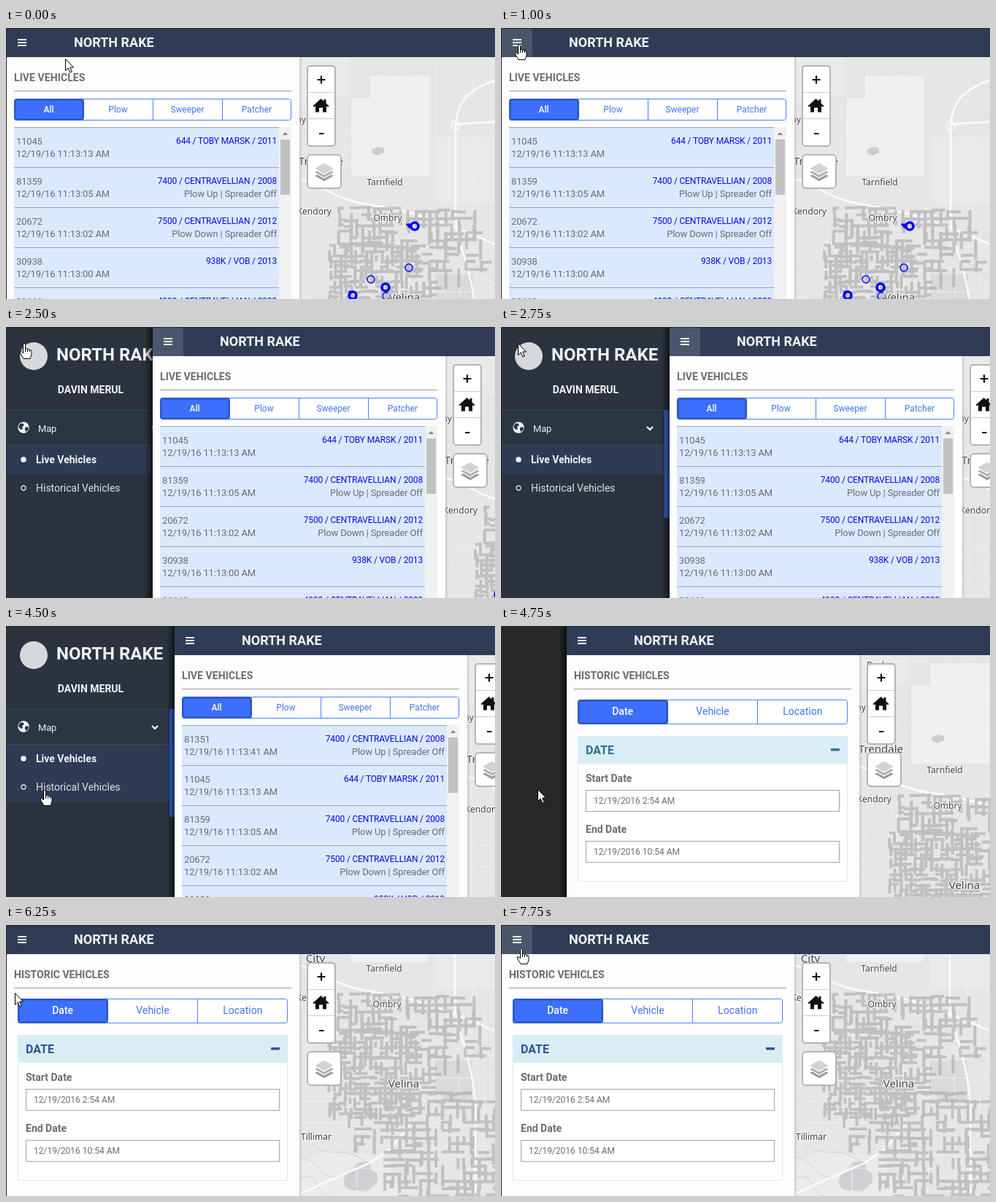
Write an HTML page that moves like this. It is 670 px wide and 372 px high and loops after 8000 ms.

```html
<!DOCTYPE html>
<html lang="en">
<head>
<meta charset="utf-8">
<title>Live vehicles</title>
<style>
html, body { margin: 0; width: 100%; height: 100%; overflow: hidden; background: #282828; }
svg { display: block; }
text { font-family: Roboto, Arial, sans-serif; font-size: 14px; fill: #6a6c74; }
.b { font-weight: 700; }
.s13 { font-size: 13px; letter-spacing: -.15px; }
.s12 { font-size: 12px; }
.mid { text-anchor: middle; }
.end { text-anchor: end; }
.light { fill: #f1f3f5; }
.on { fill: #fff; font-weight: 500; }
.link { fill: #3f74f2; }
.model { font-size: 12px; letter-spacing: -.17px; fill: #0a0ae6; text-anchor: end; }
.place text { font-family: "Noto Sans", "Open Sans", sans-serif; font-size: 12px; fill: #474747;
  stroke: #f2f2f2; stroke-width: 2.5px; stroke-linejoin: round; paint-order: stroke; }
.place .big { font-size: 15px; }
.accent { fill: #31708f; }

/* 8 s loop, one step = 3.125% */
#page, #map, #list, #cursor, #arrow, #hand, #tile, #side, #hist, #live, #marks, #past, .accent {
  animation: 8s step-end infinite; }
#page { animation-name: slide; }
#map { animation-name: pan; }
#list { animation-name: list; }
#cursor { animation-name: move; }
#arrow { animation-name: arrow; }
#hand { animation-name: hand; }
#tile { animation-name: tile; }
#side { animation-name: side; }
#hist { animation-name: hist; }
#live, #marks { animation-name: live; }
#past { animation-name: past; }
.accent { animation-name: accent; }

@keyframes slide {
  0% { transform: translateX(0); }
  28.125% { transform: translateX(1px); }
  31.25% { transform: translateX(200px); }
  34.375% { transform: translateX(230px); }
  59.375% { transform: translateX(89px); }
  62.5% { transform: translateX(0); }
}
@keyframes pan {
  0% { transform: translateY(0); }
  59.375% { transform: translateY(-14px); }
  62.5% { transform: translateY(-120px); }
  65.625% { transform: translate(-1px, -152px); }
}
@keyframes list {
  0% { transform: translateY(-55px); }
  53.125% { transform: translateY(0); }
}
@keyframes move {
  0% { transform: translate(81px, 42px); }
  3.125% { transform: translate(66px, 37px); }
  6.25% { transform: translate(48px, 30px); }
  9.375% { transform: translate(32px, 25px); }
  12.5% { transform: translate(25px, 22px); }
  34.375% { transform: translate(23px, 22px); }
  37.5% { transform: translate(30px, 60px); }
  40.625% { transform: translate(40px, 107px); }
  43.75% { transform: translate(48px, 168px); }
  46.875% { transform: translate(53px, 225px); }
  59.375% { transform: translate(50px, 224px); }
  68.75% { transform: translate(44px, 205px); }
  71.875% { transform: translate(28px, 160px); }
  75% { transform: translate(9px, 120px); }
  78.125% { transform: translate(12px, 93px); }
  81.25% { transform: translate(18px, 63px); }
  84.375% { transform: translate(40px, 48px); }
  87.5% { transform: translate(59px, 36px); }
  90.625% { transform: translate(48px, 31px); }
  93.75% { transform: translate(35px, 31px); }
  96.875% { transform: translate(28px, 32px); }
}
@keyframes arrow {
  0%, 34.375%, 59.375% { visibility: visible; }
  9.375%, 43.75%, 93.75% { visibility: hidden; }
}
@keyframes hand {
  0%, 34.375%, 59.375% { visibility: hidden; }
  9.375%, 43.75%, 93.75% { visibility: visible; }
}
@keyframes tile {
  0%, 37.5% { visibility: hidden; }
  9.375%, 93.75% { visibility: visible; }
}
@keyframes side {
  0%, 59.375% { visibility: hidden; }
  28.125% { visibility: visible; }
}
@keyframes hist {
  0%, 59.375% { visibility: hidden; }
  46.875% { visibility: visible; }
}
@keyframes live {
  0% { visibility: visible; }
  59.375% { visibility: hidden; }
}
@keyframes past {
  0% { visibility: hidden; }
  59.375% { visibility: visible; }
}
@keyframes accent {
  0% { fill: #31708f; }
  62.5% { fill: #30548f; }
}
</style>
</head>
<body>
<svg width="670" height="372" viewBox="0 0 670 372">
  <defs>
    <clipPath id="listClip"><rect x="11" y="136" width="363" height="236"/></clipPath>
    <clipPath id="mapClip"><rect x="402" y="40" width="270" height="332"/></clipPath>
    <linearGradient id="edge"><stop offset="0" stop-opacity="0"/><stop offset="1" stop-opacity=".6"/></linearGradient>
    <linearGradient id="rim"><stop offset="0" stop-color="#aaa"/><stop offset="1" stop-color="#aaa" stop-opacity="0"/></linearGradient>
  </defs>

  <g id="side">
    <rect x="1" y="1" width="230" height="371" fill="#2b343e"/>
    <circle cx="38" cy="40" r="19" fill="#d6d9dc"/>
    <text x="69" y="46" class="b light" style="font-size:24px">NORTH RAKE</text>
    <text x="116" y="91" class="b light mid">DAVIN MERUL</text>
    <rect x="1" y="114" width="223" height="48" fill="#2b3643"/>
    <path d="M1 114.5H224M1 162.5H224" stroke="#3b4a60"/>
    <rect x="1" y="163" width="223" height="39" fill="#2f3b53"/>
    <rect id="hist" x="1" y="202" width="223" height="40" fill="#2f3b53"/>
    <rect x="224" y="114" width="7" height="148" fill="#3b6de0"/>
    <circle cx="24" cy="138" r="7.7" fill="#f4f6f8"/>
    <path d="M19 133l4-1 2 3-3 2 1 3-3 1-3-4zM26 138l4-1 1 3-3 4-2-2z" fill="#2b3643"/>
    <text x="44" y="144" class="s13 light">Map</text>
    <path d="M200 137l4 4 4-4" fill="none" stroke="#fff" stroke-width="2.2"/>
    <circle cx="24" cy="182" r="3.8" fill="#eef0f2"/>
    <text x="41" y="187" class="b light">Live Vehicles</text>
    <circle cx="24" cy="221" r="3" fill="none" stroke="#dfe3e6" stroke-width="1.3"/>
    <text x="41" y="226" style="fill:#dde1e5">Historical Vehicles</text>
  </g>

  <g id="page">
    <rect x="-10" y="1" width="11" height="371" fill="url(#edge)"/>
    <rect x="1" y="1" width="670" height="371" fill="#fdfdfd"/>

    <g clip-path="url(#mapClip)">
      <rect x="402" y="40" width="270" height="332" fill="#e6e6e7"/>
      <g id="map">
        <path d="M498 64H581V204H472V95H498Z" fill="#efefef" stroke="#d6d6d6" stroke-dasharray="3 2"/>
        <path d="M501 167l9-4 8 2v6l-9 4-7-3z" fill="#cdcdce"/>
        <path d="M402 41H470V92H430L402 110ZM590 150H670V240H590Z" fill="#e9eaea"/>
        <path d="M588 338H640V396H612L588 380Z" fill="#d9dada"/>
        <path d="M402 480L440 462 520 470 545 524H402Z" fill="#ebebeb"/>
        <path d="M464 505q0-12 12-18l6-9 14-2q7 4 4 11l9 6q5 12-5 17l-8 8-20-1q-12-3-12-12z" fill="#cfd0d3"/>
        <path d="M402 470q20 4 30 18t28 8M404 500q16-8 22 6t18 18M420 452q12 14 34 12t44 16M600 296q14 18 30 22t40 30"
          fill="none" stroke="#d0d0d0"/>
        <g id="lanes" fill="none" stroke="#ededee"></g>
        <g fill="none" stroke="#fbfbfb" stroke-width="2.5">
          <path d="M402 207C432 214 450 236 500 243S590 262 670 297"/>
          <path d="M670 72C640 82 618 96 616 135V262C618 300 640 330 644 400V524"/>
          <path d="M616 133C640 128 655 132 672 128M402 522L450 500 499 479 528 459 556 424"/>
          <circle cx="616" cy="134" r="6" stroke-width="1.5"/>
        </g>
        <path id="streets" fill="none" stroke="#a9a9a9" stroke-opacity=".62" stroke-width="4"/>
        <g id="marks"></g>
        <g class="place">
          <text x="412" y="72">Bexla</text>
          <text x="411" y="130" class="end">Tolny</text>
          <text x="462" y="188" class="big end">Trendale</text>
          <text x="425" y="203" class="big mid">City</text>
          <text x="519" y="216" class="mid">Tarnfield</text>
          <text x="446" y="256" class="end">Kendory</text>
          <text x="523" y="265" class="mid">Ombry</text>
          <text x="546" y="375" class="big mid">Velina</text>
          <text x="405" y="447">Tillimar</text>
        </g>
      </g>
      <rect x="402" y="40" width="4" height="332" fill="url(#rim)" opacity=".5"/>
    </g>

    <g stroke="#b4b4b4" stroke-width="2" fill="#fff">
      <rect x="413" y="52" width="38" height="110" rx="4"/>
      <rect x="413" y="174" width="46" height="46" rx="5"/>
      <path d="M414 88.5H450M414 124.5H450" stroke="#ccc" stroke-width="1"/>
    </g>
    <path d="M426.5 71H437.5M432 65.5V76.5M429 145H435.5" stroke="#111" stroke-width="2.2"/>
    <path d="M420.5 107L431.5 97 435.5 100.5V98H438.5V103.5L442.5 107 441 108.5 439 107V115.5H434V109.5H429V115.5H424V107L422 108.5Z" fill="#111"/>
    <g stroke="#fff" stroke-width="1.4">
      <path d="M422 203l14-8 14 8-14 8z" fill="#999"/>
      <path d="M422 198l14-8 14 8-14 8z" fill="#b0b0b0"/>
      <path d="M422 193l14-8 14 8-14 8z" fill="#d2d2d2"/>
    </g>

    <rect x="1" y="1" width="670" height="39" fill="#303c55"/>
    <rect id="tile" x="1" y="1" width="42" height="39" fill="#4a566b"/>
    <path d="M16 16H28M16 20H28M16 24H28" stroke="#fff" stroke-width="2"/>
    <text x="93" y="26" class="b light" style="font-size:18px">NORTH RAKE</text>
    <path d="M11 86.5H391" stroke="#9a9a9a"/>

    <g id="live">
      <text x="11" y="73" class="b" letter-spacing=".08">LIVE VEHICLES</text>
      <g id="liveTabs"></g>
      <g clip-path="url(#listClip)"><g id="list"></g></g>
      <rect x="374" y="136" width="17" height="236" fill="#f1f1f1"/>
      <rect x="376" y="153" width="13" height="76" fill="#c1c1c1"/>
      <path d="M378.5 147l4-4 4 4z" fill="#8a8a8a"/>
    </g>

    <g id="past">
      <text x="11" y="73" class="b">HISTORIC VEHICLES</text>
      <g id="pastTabs"></g>
      <rect x="16.5" y="151.5" width="369" height="199" fill="#fff" stroke="#d6ecf3"/>
      <rect x="16" y="151" width="370" height="38" fill="#d9edf6"/>
      <text x="27" y="176" class="b accent" style="font-size:16px">DATE</text>
      <rect x="363" y="168" width="12" height="3.5" rx="1" class="accent"/>
      <g fill="#fff" stroke="#a3a3a3">
        <rect x="27.5" y="225.5" width="347" height="29"/>
        <rect x="27.5" y="295.5" width="347" height="29"/>
      </g>
      <text x="27" y="214" class="b">Start Date</text>
      <text x="38" y="244" class="s12">12/19/2016 2:54 AM</text>
      <text x="27" y="284" class="b">End Date</text>
      <text x="38" y="314" class="s12">12/19/2016 10:54 AM</text>
    </g>
  </g>

  <path d="M0 .5H670M.5 0V372" stroke="#262626"/>

  <g id="cursor" stroke="#000" stroke-linejoin="round" fill="#fff">
    <path id="arrow" d="M.5 .5V16.5L4.2 13 6.8 19 9.3 18 6.7 12H11.5Z"/>
    <path id="hand" d="M-1.5 1.5Q0-.5 1.5 1.5V8Q3.5 6.500 4.5 8.5 6.5 7.5 7.5 9.500 10 9 10 11.5V16L8 21.5H-1L-5.5 14Q-6.5 11-4 11.5L-1.5 14ZM1.5 8V12M4.5 8.500V12M7.5 9.500V12"/>
  </g>
</svg>
<script>
const byId = id => document.getElementById(id);

function tabs(id, x, y, w, h, size, names) {
  const step = w / names.length;
  const edge = i => Math.floor(x + step * i) + .5;
  const first = edge(1) - x;
  let out = `<rect x="${x + .5}" y="${y + .5}" width="${w - 1}" height="${h - 1}" rx="3" fill="#fff" stroke="#4a80f5"/>
    <rect x="${x + .5}" y="${y + .5}" width="${first - .5}" height="${h - 1}" rx="3" fill="#3c6ffb" stroke="#2a50b8"/>
    <rect x="${x + 2}" y="${y + 2}" width="${first - 3.5}" height="${h - 4}" rx="2" fill="none" stroke="#2f5cd8" stroke-width="2"/>`;
  names.forEach((name, i) => {
    if (i > 1) out += `<path d="M${edge(i)} ${y}v${h}" stroke="#4a80f5"/>`;
    out += `<text x="${x + step * (i + .5)}" y="${Math.floor(y + h / 2 + size * .34)}" class="mid ${i ? 'link' : 'on'}" style="font-size:${size}px">${name}</text>`;
  });
  byId(id).innerHTML = out;
}
tabs('liveTabs', 11, 97, 380, 30, 12, ['All', 'Plow', 'Sweeper', 'Patcher']);
tabs('pastTabs', 16, 101, 370, 34, 14, ['Date', 'Vehicle', 'Location']);

const rows = [
  ['81351', '13:41', '7400 / CENTRAVELLIAN / 2008', 'Plow Up | Spreader Off'],
  ['11045', '13:13', '644 / TOBY MARSK / 2011', ''],
  ['81359', '13:05', '7400 / CENTRAVELLIAN / 2008', 'Plow Up | Spreader Off'],
  ['20672', '13:02', '7500 / CENTRAVELLIAN / 2012', 'Plow Down | Spreader Off'],
  ['30938', '13:00', '938K / VOB / 2013', ''],
  ['20668', '12:58', '4900 / CENTRAVELLIAN / 2009', '']
];
byId('list').innerHTML = rows.map(([id, time, model, state], i) => {
  const y = 136 + 55 * i;
  return `<rect x="11" y="${y}" width="363" height="55" fill="#dbe9fe"/>
    <path d="M11 ${y + .5}H374" stroke="#a0a4aa"/>
    <text x="14" y="${y + 24}" class="s13">${id}</text>
    <text x="14" y="${y + 41}" class="s13">12/19/16 11:${time} AM</text>
    <text x="371" y="${y + 23}" class="model">${model}</text>
    <text x="371" y="${y + 41}" class="s13 end">${state}</text>`;
}).join('');

let seed = 11;
const rand = () => (seed = seed * 16807 % 2147483647) / 2147483647;

// Serviced streets: short, slightly uneven runs inside each district (x, y, w, h, spacing, density)
const districts = [
  [455, 246, 78, 54, 8, .4],
  [443, 298, 112, 116, 7, .42],
  [540, 250, 112, 82, 10, .36],
  [553, 330, 34, 56, 9, .36],
  [478, 414, 50, 40, 9, .34],
  [518, 382, 150, 140, 10, .36]
];
let d = '';
for (const [x0, y0, w, h, step, p] of districts)
  for (let y = y0; y <= y0 + h; y += step)
    for (let x = x0; x <= x0 + w; x += step) {
      const run = step * (1 + 2 * rand()), shift = 3 * rand();
      if (rand() < p) d += `M${x} ${y + shift}h${run}`;
      if (rand() < p) d += `M${x + shift} ${y}v${run}`;
    }
byId('streets').setAttribute('d', d);

let lanes = '';
for (let i = 0; i < 8; i++)
  lanes += `<path d="M402 ${300 + i * 31}H670M${412 + i * 35} 262V524"/>`;
byId('lanes').innerHTML = lanes + '<path d="M402 84H498M402 150H472M450 41V205M590 41V250M590 210H670M640 41V250"/>';

const marks = [[560, 272, 1], [552, 329], [500, 345], [520, 356, 1], [521, 368], [475, 367, 1]];
byId('marks').innerHTML = '<g fill="none" stroke="#00f">' + marks.map(([x, y, bold]) =>
  `<circle cx="${x}" cy="${y}" r="5" stroke-width="${bold ? 3.6 : 1.4}"/>`).join('') +
  '<path d="M548 269l8 0-3 6zM470 361l4 1-2 4z" fill="#00f"/></g>';
</script>
</body>
</html>
```
